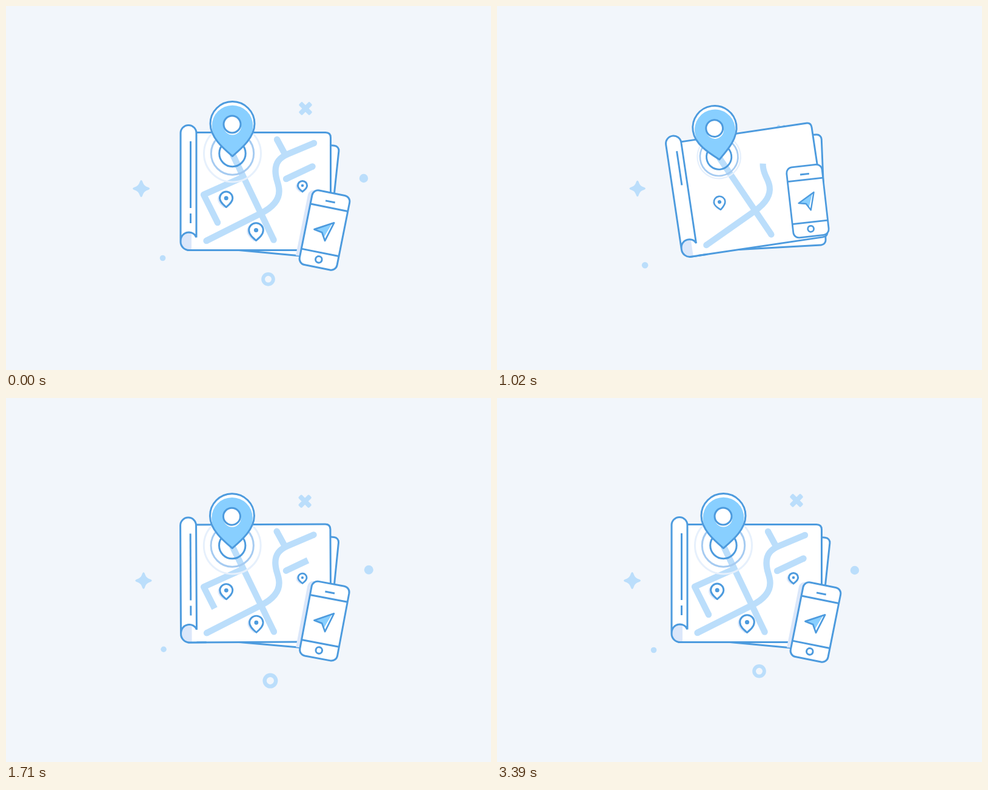
Recreate the animation shown at these times as an HTML page with a canvas. Size 800 by 600 pixels, loop 3510 ms.

```html
<!DOCTYPE html>
<html lang="en">
<head>
<meta charset="utf-8">
<title>Map</title>
<style>
  html, body { margin: 0; width: 100%; height: 100%; overflow: hidden; background: #f2f6fb; }
  canvas { display: block; width: 800px; height: 600px; }
</style>
</head>
<body>
<canvas id="stage" width="800" height="600"></canvas>
<script>
const ctx = document.getElementById('stage').getContext('2d');
const LOOP = 3510, STEP = 30, TAU = Math.PI * 2;
const BG = '#f2f6fb', LINE = '#4d9bde', PALE = '#bbdefb', BLUE = '#88cfff', SHADE = '#dbe7fa', WHITE = '#fff';

// ---- timing helpers ----
const rest = (t, start, a, tau) => t <= start ? 1 : 1 / (1 + a * (Math.exp((t - start) / tau) - 1));
const grow = (t, start, tau) => t <= start ? 0 : 1 - Math.exp((start - t) / tau);
const spring = (t, start, k) =>
  t <= start ? 0 : 1 - Math.exp(-k * (t - start)) * Math.cos((t - start) * Math.PI / 150);

// Linear ramp that swings past its end and settles.
function swing(t, start) {
  const ramp = 694, x = t - start - ramp, w = 0.0067;
  if (x < 0) return Math.max(0, 1 + x / ramp);
  return 1 + Math.sin(w * x) * Math.exp(-0.0034 * x) / (ramp * w);
}

function track(t, keys) {
  if (t <= keys[0][0]) return keys[0][1];
  for (let i = 1; i < keys.length; i++) {
    const [t0, v0] = keys[i - 1], [t1, v1] = keys[i];
    if (t < t1) return v0 + (v1 - v0) * (t - t0) / (t1 - t0);
  }
  return keys[keys.length - 1][1];
}

// ---- drawing helpers ----
function at(x, y, scale, angle, draw) {
  if (scale <= 0.001) return;
  ctx.save();
  ctx.translate(x, y);
  ctx.rotate(angle * Math.PI / 180);
  ctx.scale(scale, scale);
  draw();
  ctx.restore();
}

function paint(path, fill, stroke, width = 3) {
  if (fill) { ctx.fillStyle = fill; ctx.fill(path); }
  if (stroke) { ctx.strokeStyle = stroke; ctx.lineWidth = width; ctx.stroke(path); }
}

function disc(x, y, r) {
  const p = new Path2D();
  p.arc(x, y, r, 0, TAU);
  return p;
}

function box(x, y, w, h, r) {
  const p = new Path2D();
  p.roundRect(x, y, w, h, r);
  return p;
}

// Map pin with its tip at the origin.
function pinShape(r, h) {
  const a = 0.42 * r, b = 0.36 * r, c = h - 0.62 * r;
  return new Path2D(`M0 0C${-a} ${-b} ${-r} ${-c} ${-r} ${-h}A${r} ${r} 0 0 1 ${r} ${-h}C${r} ${-c} ${a} ${-b} 0 0Z`);
}

// ---- shapes ----
const sheet = new Path2D('M300 208.5H527Q535.5 208.5 535.5 217V394Q535.5 402.5 527 402.5H300Z');
const rollFill = new Path2D('M288 388V209.5A13 13 0 0 1 314 209.5V402.5H302A14 14 0 0 1 288 388Z');
const rollEdge = new Path2D('M314 381.5V209.5A13 13 0 0 0 288 209.5V388A14 14 0 0 0 302 402.5H330M288 388C288 370 310 369 314 381.5');
const curl = new Path2D('M289 388C289 380 294 375 301 374.5Q304 374.5 306 375.5V402H302A13 13 0 0 1 289 388Z');
const back = (() => {
  const p = new Path2D();
  p.moveTo(500, 300);
  p.arcTo(500, 226, 549.5, 231, 3);
  p.arcTo(549.8, 231, 530, 416, 8);
  p.arcTo(530, 416, 384, 402.5, 8);
  p.lineTo(384, 402.5);
  p.closePath();
  return p;
})();
const star = new Path2D('M-2 -12Q0 -16 2 -12C4 -6 6 -4 12 -2Q16 0 12 2C6 4 4 6 2 12Q0 16 -2 12C-4 6 -6 4 -12 2Q-16 0 -12 -2C-6 -4 -4 -6 -2 -12Z');

function makeRoad(d) {
  const el = document.createElementNS('http://www.w3.org/2000/svg', 'path');
  el.setAttribute('d', d);
  const len = el.getTotalLength();
  return { path: new Path2D(d), len, first: el.getPointAtLength(0), last: el.getPointAtLength(len) };
}

const mainRoad = makeRoad('M374 245L441.5 385.5');
const crossRoad = makeRoad('M330.5 387L420 342C440 332 450.5 320 450.5 305C450.5 292 444.5 287 444.5 272C444.5 258 451 250 465 244L508 226');
const leftRoad = makeRoad('M391 282L326 311L349 357');
const spurA = makeRoad('M460 244L447 220');
const spurB = makeRoad('M462 285L505.5 264.5');

function road(r, from, to) {
  from = Math.max(0, from);
  to = Math.min(r.len, to);
  if (to <= from) return;
  ctx.save();
  ctx.lineCap = 'butt';
  ctx.setLineDash([to - from, 2000]);
  ctx.lineDashOffset = -from;
  paint(r.path, null, PALE, 10.4);
  ctx.restore();
  if (from === 0) paint(disc(r.first.x, r.first.y, 5.2), PALE);
  if (to === r.len) paint(disc(r.last.x, r.last.y, 5.2), PALE);
}

function drawRoads(t) {
  road(mainRoad, 0, mainRoad.len * track(t, [[300, 0], [570, 1]]));
  const mid = 100;
  road(crossRoad,
    mid - track(t, [[540, 0], [600, 20], [720, 66], [810, 101]]),
    mid + track(t, [[540, 0], [600, 20], [840, 31], [960, 64], [1110, 132], [1230, crossRoad.len - 124], [1380, 400]]));
  road(leftRoad, 0, track(t, [[1020, 0], [1230, 41], [1470, 87], [1710, 111], [1920, 130]]));
  road(spurA, 0, track(t, [[1140, 0], [1230, 9], [1500, 30]]));
  road(spurB, 0, track(t, [[1230, 0], [1470, 27], [1710, 40], [1920, 52]]));
}

function drawRings(t) {
  const rings = [[47, 810, '#e6f0fc'], [35.2, 685, '#a6cbf1'], [21.7, 524, LINE]];
  for (const [r, start, color] of rings)
    at(373.5, 243, grow(t, start, 140), 0, () => paint(disc(0, 0, r), null, color));
}

function smallPin(t, x, y, r, h, dot, start) {
  at(x, y, spring(t, start, 0.0044), 0, () => {
    const p = pinShape(r, h);
    ctx.save();
    ctx.globalAlpha = track(t, [[900, 0], [1230, 1]]);
    ctx.translate(-3.5, 1.5);
    paint(p, SHADE);
    ctx.restore();
    paint(p, WHITE, LINE);
    paint(disc(0, -h, dot), LINE);
  });
}

function bigPin(t) {
  at(373.5, 247.5, spring(t, 615, 0.0095), 0, () => {
    const p = pinShape(36.5, 53.5);
    paint(p, WHITE);
    ctx.save();
    ctx.clip(p);
    ctx.translate(0, 1);
    paint(pinShape(33.8, 51), BLUE);
    ctx.restore();
    paint(p, null, LINE);
    paint(disc(0, -49.5, 14.5), WHITE);
    paint(disc(-0.5, -52.5, 14), WHITE, LINE);
  });
}

function drawRoll(t) {
  paint(rollFill, WHITE);
  paint(curl, SHADE);
  paint(rollEdge, null, LINE);
  const n = track(t, [[750, 0], [840, 22], [1020, 58], [1230, 85], [1530, 110]]);
  const m = track(t, [[1140, 0], [1230, 6], [1440, 16]]);
  ctx.fillStyle = LINE;
  ctx.fillRect(303, 223, 3, n);
  ctx.fillRect(303, 358 - m, 3, m);
}

function drawPhone(t) {
  const px = 319, py = 388;
  const scale = 1 - rest(t, 528, 2, 203);
  const turn = -395 * rest(t, 90, 0.47, 207);
  const body = box(-31.5, -62.5, 63, 125, 10);
  const pose = draw => at(px, py, scale, turn, () => at(525.5 - px, 369.5 - py, 1, 11.3, draw));

  ctx.save();
  const paper = new Path2D(sheet);
  paper.addPath(back);
  ctx.clip(paper);
  ctx.globalAlpha = track(t, [[1080, 0], [1560, 1]]);
  pose(() => { ctx.translate(-7, 1); paint(body, SHADE); });
  ctx.restore();

  pose(() => {
    paint(body, WHITE, LINE);
    paint(new Path2D('M-31.5 -38H31.5M-31.5 37.5H31.5M-8 -48H8'), null, LINE);
    paint(disc(0, 49.3, 5.3), null, LINE);
    at(0, 0, grow(t, 600, 130), 0, () => {
      const arrow = new Path2D('M13 -15L-17 2L-3.5 4.5L4 17Z');
      paint(arrow, WHITE);
      paint(new Path2D('M10 -13L-17 2L-3.5 4.5L1 12Z'), BLUE);
      paint(arrow, null, LINE, 2.7);
    });
  });
}

function drawDecor(t) {
  const items = [
    [-141.5, 115.5, () => paint(disc(0, 0, 4.8), PALE)],
    [-177, 1, () => paint(star, PALE)],
    [94, -131, () => {
      ctx.rotate(Math.PI / 4);
      paint(box(-12.5, -4, 25, 8, 2.2), PALE);
      paint(box(-4, -12.5, 8, 25, 2.2), PALE);
    }],
    [190, -16, () => paint(disc(0, 0, 7.2), PALE)],
    [32.5, 150.3, () => paint(disc(0, 0, 8.4), null, PALE, 5.8)]
  ];
  items.forEach(([x, y, draw], i) =>
    at(400, 300, swing(t, 210 + 150 * i), 0, () => at(x, y, 1, 0, draw)));
}

function render(t) {
  ctx.fillStyle = BG;
  ctx.fillRect(0, 0, 800, 600);
  ctx.lineJoin = 'round';
  drawDecor(t);
  const scale = 1 - rest(t, 90, 0.333, 190);
  const turn = -360 * rest(t, 90, 0.47, 207);
  at(400, 300, scale, turn, () => {
    ctx.translate(-400, -300);
    paint(back, WHITE, LINE);
    paint(sheet, WHITE, LINE);
    drawRoads(t);
    drawRings(t);
    smallPin(t, 363.2, 331.5, 10.6, 14.8, 3.5, 780);
    smallPin(t, 412.5, 386.5, 11.8, 17, 3.6, 1080);
    smallPin(t, 489, 306, 7.6, 10, 2.3, 1135);
    drawRoll(t);
    bigPin(t);
    drawPhone(t);
  });
}

// The loop opens on the finished picture, then builds it up from nothing.
function tick(now) {
  const t = Math.floor((now % LOOP) / STEP) * STEP;
  render(t < STEP ? LOOP : t);
}

const begin = performance.now();
function frame() {
  tick(Math.max(0, performance.now() - begin));
  requestAnimationFrame(frame);
}
frame();
</script>
</body>
</html>
```
